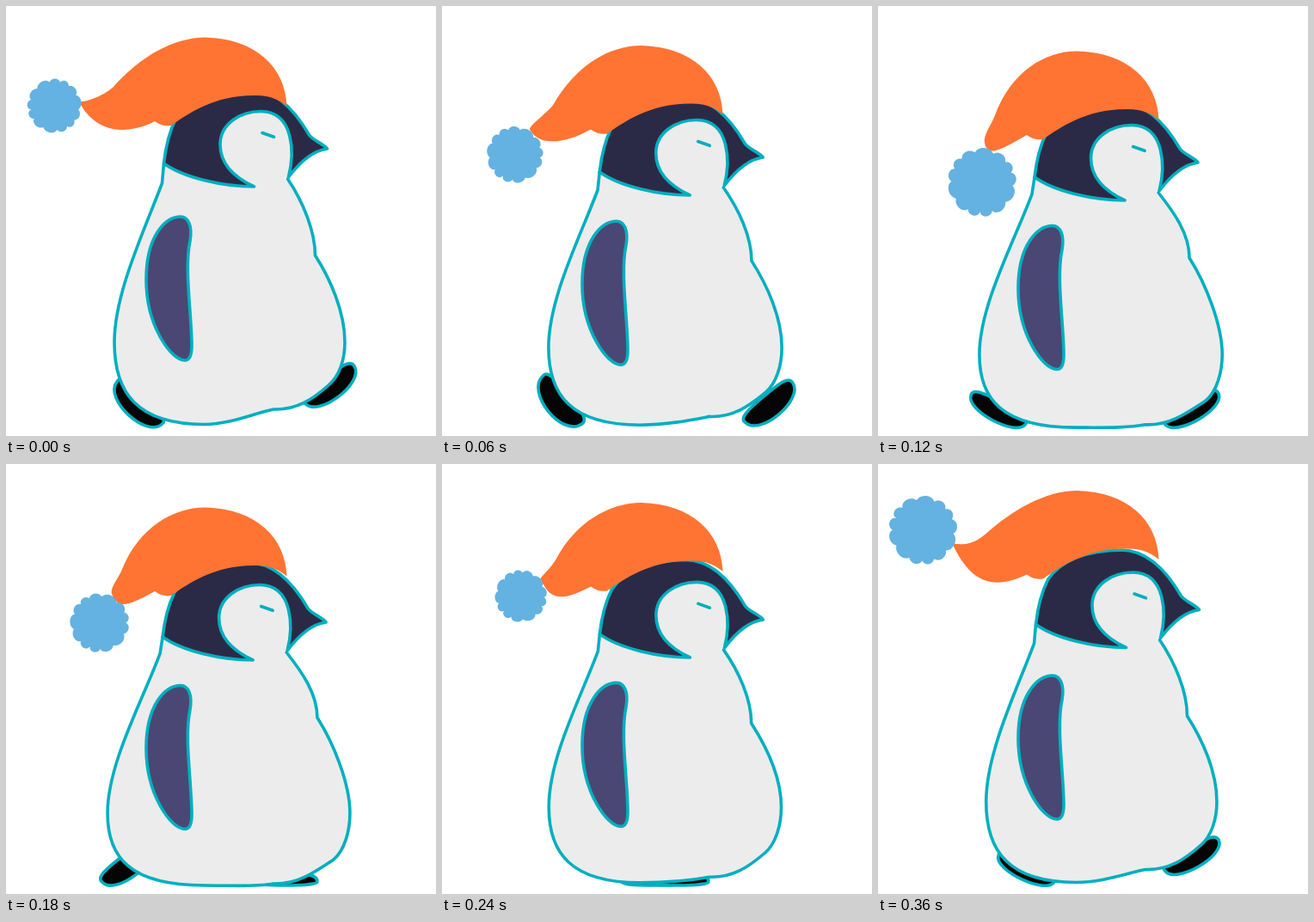
Write an HTML page that moves like this. It is 500x500 px and loops after 0.39 s.

```html
<!DOCTYPE html>
<html lang="en">
<head>
<meta charset="utf-8">
<title>Walking penguin</title>
<style>
  html, body { margin: 0; width: 100%; height: 100%; overflow: hidden; background: #fff; }
  svg { display: block; width: 100vw; height: 100vh; }
  .line { stroke: #00afc0; stroke-width: 3.6; stroke-linecap: round; stroke-linejoin: round; }
  .light { fill: #ececec; }
  .dark { fill: #2b2a46; }
  .wing { fill: #4a4774; }
  .hat { fill: #ff7433; }
  .pom { fill: #63b2e1; }
  .foot { fill: #050505; }
</style>
</head>
<body>
<svg viewBox="0 0 500 500">
  <path id="footA" class="foot line"/>
  <path id="footB" class="foot line"/>
  <path id="body" class="light line"/>
  <path id="wing" class="wing line" d="M203 245C212 245 217 256 214 273C207 305 216 360 216 395C216 407 213 412 208 412C192 412 163 372 163 318C163 268 185 245 203 245Z"/>
  <g id="head">
    <path class="light" d="M288 210C262 198 248.5 182 248.5 161C248.5 137 272 122.5 296 122.5C335 123 335 172 328 199Z"/>
    <path class="dark line" d="M183 183C185 165 189 147 197 131C215 104 250 97 283 96.5C314 97 337 124 352 150C356 156 370 161 373 166C358 168 343 179 328 199C335 172 335 123 296 122.5C272 122.5 248.5 137 248.5 161C248.5 182 262 198 288 210C250 210 205 199 183 183Z"/>
    <path class="line" fill="none" d="M297.5 147.5L311 152.3"/>
  </g>
  <path id="hat" class="hat"/>
  <path id="pom" class="pom"/>
</svg>
<script>
const STEP = 30, STEPS = 13, STRIDE = 2 * STEPS;
const { sin, cos, abs, max, min, exp, PI } = Math;

const el = id => document.getElementById(id);
const draw = (id, d) => el(id).setAttribute("d", d);
const place = (id, x, y, turn = 0) =>
  el(id).setAttribute("transform", `translate(${x} ${y}) rotate(${turn})`);

const mod = (a, n) => (a % n + n) % n;
const ramp = (t, from, to) => max(0, min(1, (t - from) / (to - from)));
const smooth = (t, from, to) => {
  const u = ramp(t, from, to);
  return u * u * (3 - 2 * u);
};
const easeOut = (u, power) => 1 - (1 - u) ** power;
const cycle = (step, peak) => cos(2 * PI * (step - peak) / STEPS);

// 0 at step `low`, 1 at step `high`, and back again within one loop.
function wave(step, low, high, outPower, inPower) {
  const t = mod(step - low, STEPS), rise = mod(high - low, STEPS);
  return t < rise
    ? easeOut(t / rise, outPower)
    : 1 - ((t - rise) / (STEPS - rise)) ** inPower;
}

// One foot swings forward, lands on its heel, slides back and pushes off.
function drawFoot(id, phase) {
  const p = 6 + mod(phase - 6, STRIDE);
  const forward = easeOut(ramp(p, 6, 14), 2) - smooth(p, 15, 28);
  const toeUp = 38 * (1 - smooth(p, 6, 8)) + 40 * (smooth(p, 8, 14) - smooth(p, 16, 19));
  const heelUp = 51 * smooth(p, 23, 27) - 89 * smooth(p, 29, 32);
  const turn = heelUp - toeUp, tilt = abs(sin(turn * PI / 180));
  const kick = 24 * exp(-((p - 13) ** 2) / 1.6);
  const sole = (4 + 22 * tilt) * 4 / 3;
  place(id, 140 + 240 * forward, 486 - 36 * tilt - kick, turn);
  draw(id, `M-36 0C-34 ${sole} 34 ${sole} 36 0C37 -9 24 -9 0 -9S-38 -8 -36 0Z`);
}

function drawBody(hx, hy, sink, squash) {
  const x = 181 + hx - squash, y = 206 + hy * .8;
  const tipX = 327 + hx, tipY = 201 + hy;
  const notchX = 359.5 + 2.5 * squash, notchY = 290 + 15 * sink - 10 * squash;
  const left = 126 - 1.5 * sink - 6.5 * squash, right = 394 + 6 * squash;
  const mid = 391 + 9 * sink + 6 * squash;
  const base = 486.5 + 3.5 * squash, rear = 469 + 13 * sink + 6 * squash;
  const cx = right - 19, cy = rear - 28;
  draw("body", `M${183 + hx} ${183 + hy}L${x} ${y}` +
    `C${x - 21} ${y + 56} ${left} ${mid - 57} ${left} ${mid}` +
    `C${left} ${mid + (base - mid) * .61} ${left + 26} ${base} 230 ${base}` +
    `C262 ${base} 290 ${rear + 4} 311 ${rear}` +
    `C338 ${rear + 1} 357 ${rear - 12} ${cx} ${cy}` +
    `C${right - 6} ${cy - 11} ${right} ${mid + 20} ${right} ${mid}` +
    `C${right} ${mid - 35} ${notchX + 18} ${notchY + 28} ${notchX} ${notchY}` +
    `C${notchX} ${notchY - 28} ${tipX + 18} ${tipY + (notchY - tipY) * .3} ${tipX} ${tipY}`);
}

// The tail of the hat hangs from a joint; droop 0 is flung back, 1 hangs down.
function drawHat(h, droop, tipX, tipY) {
  const jx = 125 + .3 * (tipX - 88), jy = 86.5 + 24 * droop + h;
  const dx = tipX - jx, dy = tipY - jy, up = 1 - droop;
  draw("hat", `M326.5 ${115.5 + h}C325 ${70 + h} 290 ${37 + h} 232 ${35.5 + h}` +
    `C194 ${35.5 + h} 155 ${59 + h} ${jx} ${jy}` +
    `C${jx + .35 * dx} ${jy + .35 * dy + 8 * up} ${jx + .7 * dx - 6 * droop} ${jy + .7 * dy + 6 * up} ${tipX} ${tipY}` +
    `C${tipX + 20 - 16 * droop} ${139 + 18 * droop ** 2 + h} ${130 + 8 * droop} ${153.5 + h} 173 ${133 + h}` +
    `C180 ${138 + h} 186 ${139 + h} 192 ${138 + h}` +
    `C212 ${124 + h} 242 ${103 + h} 288 ${103 + h}` +
    `C308 ${102.5 + h} 319 ${109 + h} 326.5 ${115.5 + h}Z`);
}

function drawPom(droop, tipX, tipY) {
  const r = 30 + 10 * (2 * droop - 1) ** 2;
  const reach = r - 3 + 8 * droop ** 2;
  const swing = (204 - 110 * droop) * PI / 180;
  const x = tipX + reach * cos(swing), y = tipY + reach * sin(swing);
  const pts = [];
  for (let i = 0; i < 182; i++) {
    const a = i / 182 * 2 * PI;
    const d = r * (.86 + .14 * abs(sin(6.5 * a + .5 * sin(3 * a))) ** .5);
    pts.push(`${x + d * cos(a + swing)} ${y + d * sin(a + swing)}`);
  }
  draw("pom", `M${pts.join("L")}Z`);
}

function render(step) {
  const sink = wave(step, 0, 6, 2, 1.4);
  const squash = 1.15 * max(0, cycle(step, 4.9));
  const headX = .5 - 1.4 * squash, headY = 18 * sink;
  const hatY = 22.3 * wave(step, 12, 4.5, 1.4, 1.3) - 4.5;
  const droop = wave(step, 12, 4, 1.6, 1.3);
  const tipX = 90 + 38 * droop ** 2 + 11 * cycle(step, 8);
  const tipY = 96.5 + 46.5 * droop + hatY;

  drawFoot("footA", step);
  drawFoot("footB", step + STEPS);
  drawBody(headX, headY, sink, squash);
  place("wing", 0, 12.5 * sink ** 1.5);
  place("head", headX, headY);
  drawHat(hatY, droop, tipX, tipY);
  drawPom(droop, tipX, tipY);
}

let start, last = 0;
function tick(now) {
  start ??= now;
  const step = Math.floor((now - start) / STEP) % STEPS;
  if (step !== last) render(last = step);
  requestAnimationFrame(tick);
}
render(0);
requestAnimationFrame(tick);
</script>
</body>
</html>
```
